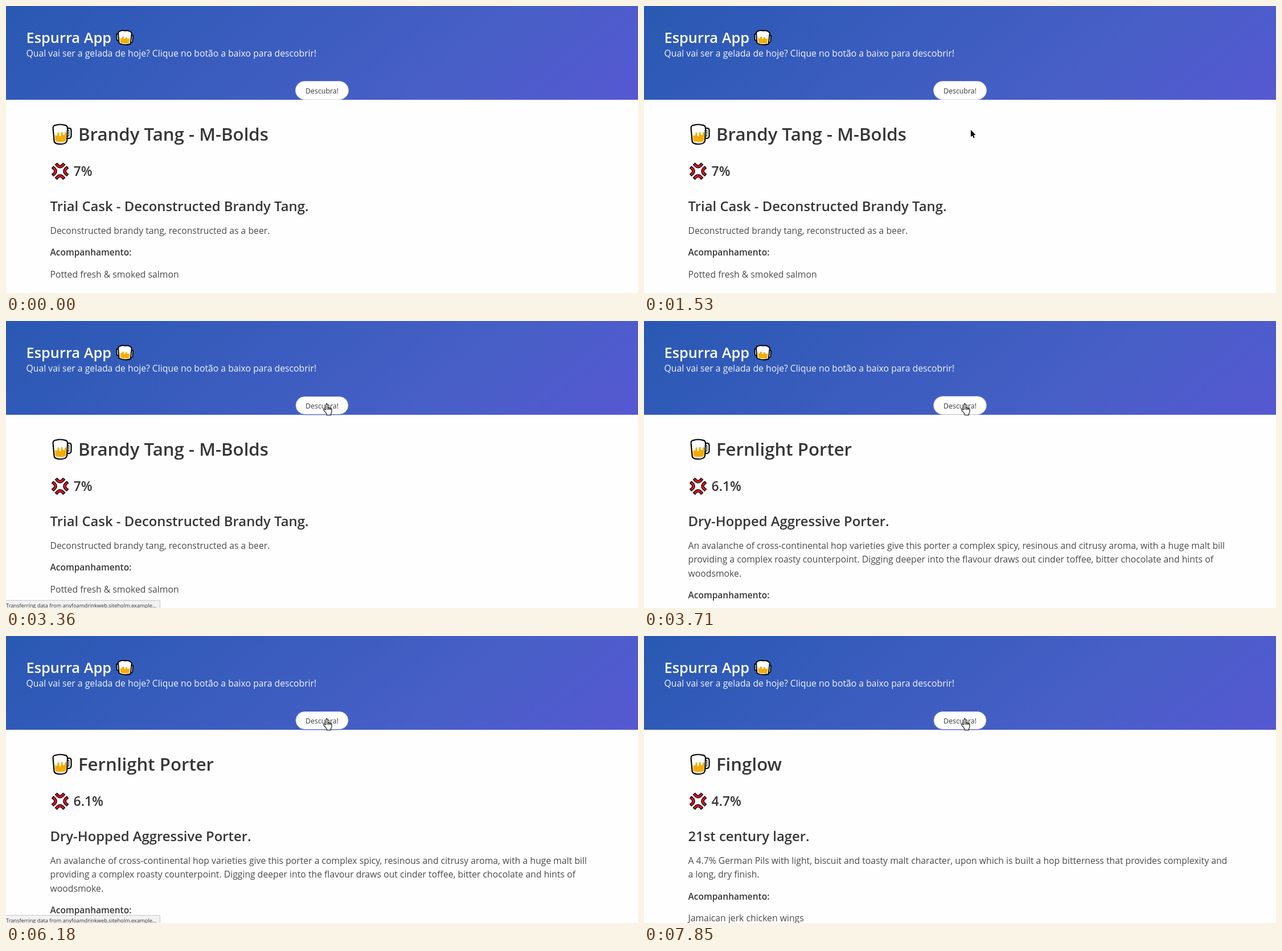
An HTML page for the animation above (8 s loop, 1110 px wide and 505 px high).

```html
<!DOCTYPE html>
<html lang="pt-BR">
<head>
<meta charset="utf-8">
<title>Espurra App</title>
<style>
  html, body { margin: 0; width: 100%; height: 100%; overflow: hidden; background: #fefefe; }
  header { position: absolute; width: 1110px; height: 165px;
    background: linear-gradient(141deg, #2959b3 0%, #485fc7 71%, #5658d2 100%); }
  svg { position: absolute; left: 0; top: 0; font: 15.75px "Open Sans", "Noto Sans", sans-serif; fill: #4a4a4a; }
  .strong { font-weight: 600; fill: #363636; }
  .name { font-size: 31.2px; }
  .abv { font-size: 23px; }
  .tagline { font-size: 23.85px; }
  .label { font-size: 15.5px; }
  .ink { stroke: #000; stroke-linejoin: round; stroke-linecap: round; }
</style>
</head>
<body>
<header></header>
<svg width="1110" height="505" viewBox="0 0 1110 505">
  <defs>
    <path id="arc" d="M8.500 2.600Q14 9.400 19.500 2.600"/>
    <g id="arcs">
      <use href="#arc"/>
      <use href="#arc" transform="rotate(90 14 14)"/>
      <use href="#arc" transform="rotate(180 14 14)"/>
      <use href="#arc" transform="rotate(270 14 14)"/>
    </g>
  </defs>

  <text class="strong" x="35.500" y="64.500" style="font-size:25.4px;fill:#fff">Espurra App</text>
  <g class="ink" fill="#fff" stroke-width="1.900">
    <path d="M199 49.500h-4.800l.6 10.500 4.500 1.500ZM219 51l4 1.200-.8 11-4 1.800Z"/>
    <path d="M197 46.500Q202 41.500 209 43.500Q217 42 220.800 47.500L218.600 67Q208 70 198.600 65.500Z"/>
    <path d="M200.500 56q2 2 3.500 0v-2h3v3.500q1.500 1.500 3-.5v-2h3v2.500q2 1 4.500-1l-1.200 9q-7.500 1.500-15.300-1Z" fill="#f7ab00" stroke="none"/>
  </g>
  <text x="35.500" y="88.700" fill="#fff" fill-opacity=".95">Qual vai ser a gelada de hoje? Clique no botão a baixo para descobrir!</text>

  <rect id="ring" x="507.200" y="131.200" width="95.600" height="34.600" rx="17.300" fill="none" stroke="#485fc7" stroke-opacity=".25" stroke-width="1.650"/>
  <rect id="button" x="508.500" y="132.500" width="93" height="32" rx="16" fill="#fff"/>
  <text x="555" y="154" text-anchor="middle" style="font-size:12.4px;fill:#363636">Descubra!</text>

  <g class="ink" transform="translate(80.500 207.500)" fill="#fff" stroke-width="2.200">
    <path d="M27 7.500h3.500q3.500 0 3.500 4v9q0 4.500-4 5h-3.500"/>
    <path d="M27.500 11h2.500v10.500h-3" stroke-width="1"/>
    <path d="M2.200 9Q1 2.500 7 2.200Q14 0 21 1.800Q28 2 27.500 8.500L26.600 29Q26 35.500 15 35.500T4 29.500Z"/>
    <g stroke="none">
      <path d="M5.500 19.500q2.500 2.500 4.500-.5v-4h3v6q1.500 2 3 0v-6.500h3v4q2 2.500 3.500 0v-3.500h3L24.800 29Q24 31.500 15 31.500T6 29Z" fill="#f7ab00"/>
      <path d="M6 30.500q9 3.500 18.500 0v1.300q-9 3.600-18.500 0Z" fill="#cfcfcf"/>
    </g>
  </g>
  <g transform="translate(81 276.700)" fill="none" stroke-linecap="square">
    <use href="#arcs" stroke="#000" stroke-width="5.500"/>
    <use href="#arcs" stroke="#e81224" stroke-width="2.900"/>
  </g>
  <g id="beer"></g>

  <g id="status">
    <rect id="statusBox" x="-2" y="491.500" height="16" rx="1.500" fill="#f2f2f2" stroke="#c6c6c6"/>
    <text id="statusText" x="0" y="504" style="font-size:9.24px;fill:#333"></text>
  </g>

  <path id="arrow" class="ink" d="M0 0V12.500L2.900 9.800L4.900 14.300L6.800 13.400L4.900 9.100H8.600Z" fill="#000" style="stroke:#fff;stroke-width:.8;paint-order:stroke"/>
  <g id="hand" class="ink" stroke-width="1.100">
    <path d="M-.5 10V1.500a1.600 1.600 0 0 1 3.200 0V7q1.400-.8 2.500.3q1.400-.7 2.400.5q1.800-.4 1.900 1.400V13q0 2.200-1.400 4v2.500H.8v-2L-4.600 10.800q-.6-2 1.400-1.900Z" fill="#fff"/>
    <path d="M2.700 7v3M5.200 7.300V10M7.600 7.800V10" fill="none"/>
  </g>
</svg>
<script>
const LOOP = 8000;
const $ = id => document.getElementById(id);

const beers = [
  { from: 0, name: "Brandy Tang - M-Bolds", abv: "7%",
    tagline: "Trial Cask - Deconstructed Brandy Tang.",
    lines: ["Deconstructed brandy tang, reconstructed as a beer."],
    food: "Potted fresh &amp; smoked salmon" },
  { from: 3710, name: "Fernlight Porter", abv: "6.1%",
    tagline: "Dry-Hopped Aggressive Porter.",
    lines: [
      "An avalanche of cross-continental hop varieties give this porter a complex spicy, resinous and citrusy aroma, with a huge malt bill",
      "providing a complex roasty counterpoint. Digging deeper into the flavour draws out cinder toffee, bitter chocolate and hints of",
      "woodsmoke."],
    food: "" },
  { from: 6570, name: "Finglow", abv: "4.7%",
    tagline: "21st century lager.",
    lines: [
      "A 4.7% German Pils with light, biscuit and toasty malt character, upon which is built a hop bitterness that provides complexity and",
      "a long, dry finish."],
    food: "Jamaican jerk chicken wings" }
];

const host = "anyfoamdrinkweb.siteholm.example...";
const idle = { border: "#b5b5b5" };
const pressed = { border: "#4a4a4a" };
const focused = { border: "#485fc7", ring: true };
const waiting = { ...focused, status: "Waiting for " + host, width: 216.5 };
const transferring = { ...focused, status: "Transferring data from " + host, width: 272.5 };
const phases = [
  [0, idle], [2680, pressed], [2820, focused], [2960, waiting], [3360, transferring],
  [3710, idle], [5430, pressed], [5570, focused], [5710, waiting], [6180, transferring],
  [6570, idle], [7710, pressed], [7850, focused]
];

// Pointer path: time, x, y
const path = [
  [1060, 1034, 490], [1260, 790, 352], [1395, 650, 264], [1529, 574, 218],
  [1663, 568, 178], [1730, 567, 160], [1797, 566, 151], [1864, 564, 149]
];

function pointerAt(t) {
  if (t >= 2680) return [562.5, 146];
  const step = 67, snapped = path[0][0] + Math.floor((t - path[0][0]) / step) * step;
  const next = path.findIndex(p => p[0] > snapped);
  if (next < 0) return path[path.length - 1].slice(1);
  const a = path[next - 1], b = path[next], k = (snapped - a[0]) / (b[0] - a[0]);
  return [a[1] + (b[1] - a[1]) * k, a[2] + (b[2] - a[2]) * k];
}

function beerMarkup({ name, abv, tagline, lines, food }) {
  const text = (x, y, content, cls = "") => `<text x="${x}" y="${y}" class="${cls}">${content}</text>`;
  const lineHeight = 24.75, labelY = 438.8 + (lines.length - 1) * lineHeight;
  return text(127, 237, name, "strong name") +
    text(118.5, 299, abv, "strong abv") +
    text(77.5, 361, tagline, "strong tagline") +
    lines.map((line, i) => text(77.5, 400.5 + i * lineHeight, line)).join("") +
    text(77.5, labelY, "Acompanhamento:", "strong label") +
    text(77.5, labelY + 38.7, food);
}

const show = (id, visible) => $(id).style.display = visible ? "" : "none";
let shownBeer;

function draw() {
  const t = performance.now() % LOOP;

  const beer = beers.findLast(b => t >= b.from);
  if (beer !== shownBeer) {
    $("beer").innerHTML = beerMarkup(beer);
    shownBeer = beer;
  }

  const hasPointer = t >= path[0][0];
  const [x, y] = hasPointer ? pointerAt(t) : [0, 505];
  const hover = y < 165;
  for (const id of ["arrow", "hand"]) $(id).setAttribute("transform", `translate(${x} ${y})`);
  show("arrow", hasPointer && !hover);
  show("hand", hover);

  const phase = phases.findLast(p => t >= p[0])[1];
  $("button").setAttribute("stroke", hover ? phase.border : "#dbdbdb");
  show("ring", phase.ring);
  show("status", phase.status);
  if (phase.status) {
    $("statusText").textContent = phase.status;
    $("statusBox").setAttribute("width", phase.width);
  }
  requestAnimationFrame(draw);
}
draw();
</script>
</body>
</html>
```
